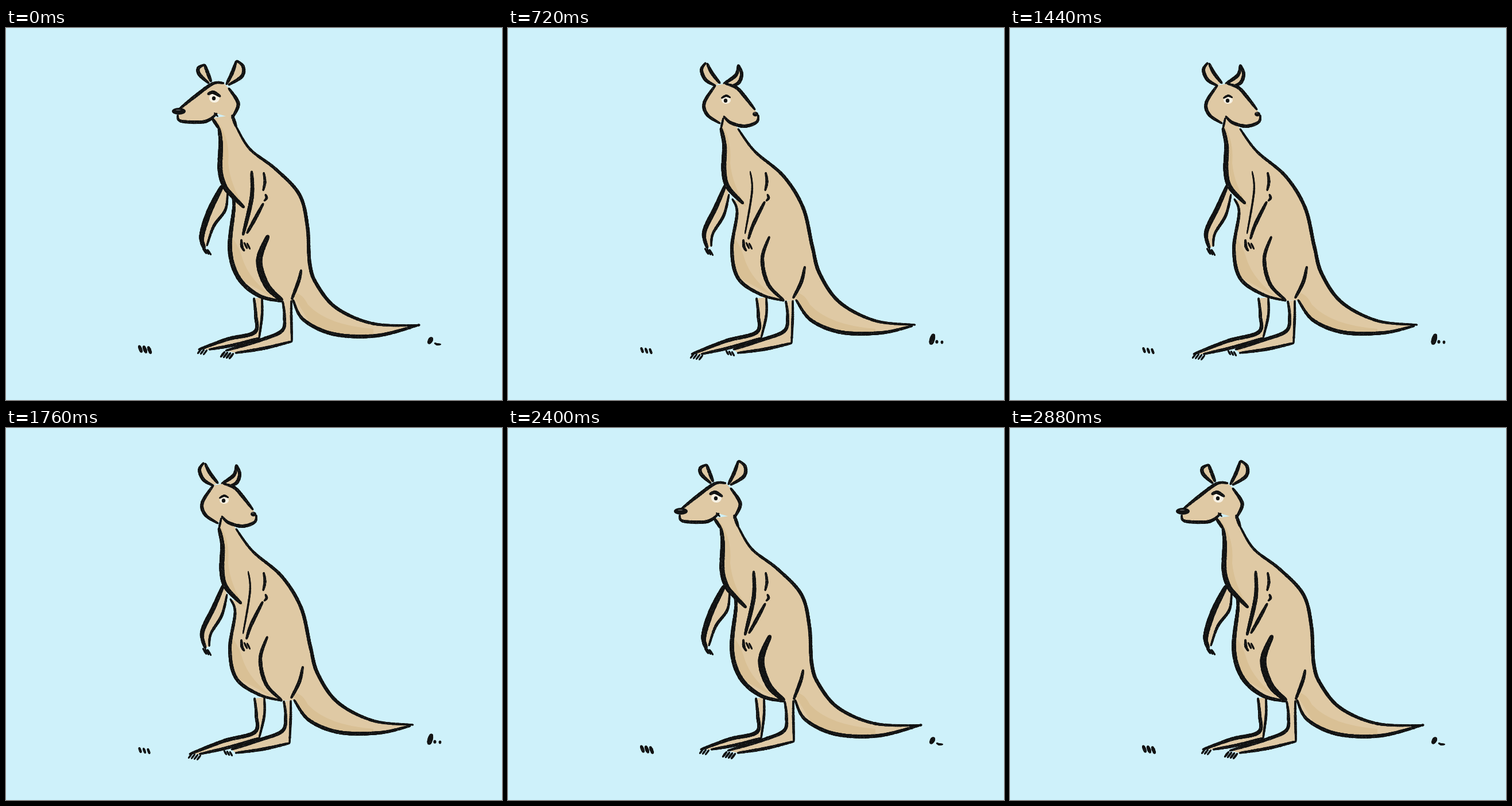
These frames come from a looping animation (864x648 px, 2960 ms). An HTML page with a canvas:

```html
<!DOCTYPE html>
<html lang="en">
<head>
<meta charset="utf-8">
<title>Kangaroo</title>
<style>
html, body { margin: 0; width: 100%; height: 100%; overflow: hidden; background: #cef1fa; }
canvas { display: block; }
</style>
</head>
<body>
<canvas id="stage" width="864" height="648"></canvas>
<script>
const SKY = '#cef1fa', TAN = '#dfc9a4', SHADE = '#d9c095', INK = '#131414';
const TAU = Math.PI * 2;
let g, seed;
const random = () => (seed = seed * 16807 % 2147483647) / 2147483647;

// Catmull-Rom samples through "x y x y ..." points, about one per pixel.
function sample(text) {
  const n = text.split(' ').map(Number), pts = [], out = [];
  while (n.length) pts.push(n.splice(0, 2));
  for (let i = 0; i < pts.length - 1; i++) {
    const b = pts[i], c = pts[i + 1], a = pts[i - 1] || b, d = pts[i + 2] || c;
    const steps = Math.ceil(Math.hypot(c[0] - b[0], c[1] - b[1]));
    for (let k = 0; k <= steps; k++) {
      const t = k / steps;
      out.push(b.map((v, j) => v + t / 2 * (c[j] - a[j] +
        t * (2 * a[j] - 5 * v + 4 * c[j] - d[j] + t * (3 * (v - c[j]) + d[j] - a[j])))));
    }
  }
  return out;
}

function oval(x, y, rx, ry, color) {
  g.fillStyle = color;
  g.beginPath();
  g.ellipse(x, y, rx, ry, 0, 0, TAU);
  g.fill();
}

// Tapered brush line with a chalky grain.
function ink(w, text) {
  const pts = sample(text), last = pts.length - 1;
  const width = i => w * (0.45 + 0.55 * Math.sqrt(Math.max(0, Math.sin(Math.PI * i / last))));
  pts.forEach(([x, y], i) => {
    const r = width(i) / 2 * (0.92 + random() * 0.16);
    oval(x, y, r, r, INK);
  });
  g.fillStyle = 'rgba(125,130,128,.45)';
  pts.forEach(([x, y], i) => {
    const v = width(i);
    if (v > 4 && random() < 0.35) g.fillRect(x + (random() - .5) * v, y + (random() - .5) * v, 1, 1);
  });
}

function fill(forward, backward) {
  const path = new Path2D();
  const pts = forward.flatMap(sample).concat(backward.flatMap(s => sample(s).reverse()));
  for (const [x, y] of pts) path.lineTo(x, y);
  g.fillStyle = TAN;
  g.fill(path);
  return path;
}

function ticks(x, y, gap, lean, len, count = 3, w = 3.5) {
  for (let i = 0; i < count; i++) {
    const tx = x + i * gap, ty = y + i;
    ink(w, `${tx} ${ty} ${tx + lean} ${ty + len}`);
  }
}

// Hip, leg width, ankle, instep, toe, heel and end of the sole.
function leg(w, x, y, wide, ax, ay, mx, my, tx, ty, hx, hy, sx, sy) {
  const knee = (y + ay) / 2;
  const front = `${x} ${y} ${x + 3} ${knee} ${ax} ${ay} ${mx} ${my} ${tx} ${ty}`;
  const back = `${x + wide} ${y - 2} ${x + wide} ${knee} ${hx} ${hy}`;
  const sole = `${hx} ${hy} ${(hx + sx) / 2} ${(hy + sy) / 2 + 2} ${sx} ${sy}`;
  fill([front], [sole, back]);
  ink(w, front);
  ink(4.5, back);
  ink(5.5, sole);
}

const upright = {
  chest: '371 175 374 200 373 248 381 276 393 291 414 312',
  belly: '394 292 397 312 390 385 405 435 440 466 480 476',
  back: '401 172 425 211 470 246 511 290 525 345 529 410 541 446 576 488 640 515 720 518',
  tail: '500 474 518 508 570 533 645 536 720 517',
  arm: '376 276 354 320 341 362 345 383', armW: 10,
  inner: '386 288 382 317 362 345 350 379',
  sleeve: '428 250 428 295 413 360', sleeveW: 7,
  elbow: '448 306 434 332 420 357',
  thigh: '456 363 441 405 454 448 480 474', thighW: 11,
  haunch: '514 422 510 440 498 472'
};
const leaning = {
  chest: '371 175 377 205 376 248 383 277 409 305',
  belly: '391 298 399 322 390 385 401 436 440 464 480 475',
  back: '401 176 430 215 480 258 514 313 530 380 543 428 578 478 640 510 709 517',
  tail: '502 474 528 509 580 530 650 531 704 519',
  arm: '379 273 362 312 342 355 347 383', armW: 8,
  inner: '385 290 376 326 357 358 354 380',
  sleeve: '422 250 425 285 413 358', sleeveW: 3.5,
  elbow: '447 303 427 343 419 367',
  thigh: '455 364 443 402 453 446 480 474', thighW: 6.5,
  haunch: '517 416 511 442 497 470'
};

// Heads: neck front and back, brow, mouth, skull, then ears as outer and inner edges.
const leftUpright = {
  neck: ['359 157 371 175', '394 152 401 172'],
  face: ['379 96 360 97 328 120 302 141', '299 152 304 162 338 164 354 160 367 149',
    '388 105 402 125 404 137 394 157'],
  ears: ['345 64 335 70 337 81 353 96', '346 64 357 93', '402 57 413 67 411 84 388 99', '401 58 394 78 384 98'],
  nose: [301, 145, 12, 6], eye: [363, 122, 9, 8], lid: '352 115 361 112 373 119', lidW: 6
};
const leftLeaning = {
  neck: ['361 159 371 175', '395 156 401 176'],
  face: ['378 96 362 98 335 118 303 142', '301 151 299 159 306 164 340 165 368 153',
    '388 107 405 131 405 142 396 157'],
  ears: ['345 63 335 71 339 84 351 95', '347 64 361 95', '400 57 413 68 410 83 388 100', '400 60 394 80 383 97'],
  nose: [300, 146, 10, 4.5], eye: [361, 122, 8, 7], lid: '351 115 360 113 371 118', lidW: 4
};
const rightUpright = {
  neck: ['375 157 371 175', '393 165 401 172'],
  face: ['376 97 398 102 413 118 431 145', '434 153 433 162 410 170 388 165 376 154',
    '360 103 342 131 348 152 371 166'],
  ears: ['344 62 335 74 342 91 360 102', '346 62 354 77 369 97', '397 64 407 80 403 95 385 99', '394 65 389 81 375 96'],
  nose: [429, 150, 6, 5], eye: [380, 127, 7, 9], lid: '372 121 378 118 386 121', lidW: 6
};
const rightLeaning = {
  neck: ['375 157 371 175', '393 165 401 176'],
  face: ['379 97 398 104 412 119 430 142', '436 152 433 164 412 171 388 165 376 154',
    '361 100 342 130 347 151 369 166'],
  ears: ['344 61 337 73 344 90 360 100', '347 62 355 78 369 96', '402 65 407 80 402 95 388 102', '401 65 397 82 376 97'],
  nose: [431, 150, 5, 4], eye: [380, 126, 8, 6], lid: '372 122 380 118 387 121', lidW: 4
};

const shading = new Path2D('M366 160 Q391 190 387 235 Q391 275 416 312 L360 280Z' +
  'M380 350 Q404 372 412 402 Q424 440 470 472 L375 420Z' +
  'M498 462 Q514 458 526 482 Q560 518 640 524 L640 545 L540 532Z');

function drawLegs(right, lean) {
  // far leg first
  const reach = right ? [320, 568, 337, 568] : [336, 560, 354, 560];
  const [tx, ty, sx, sy] = reach;
  const mid = right ? 380 : 386;
  leg(lean && !right ? 5 : 6.5, 432 + lean, 471, 14 + 3 * lean * right, 433, 530, mid, right ? 545 : 542, tx, ty, 441, 540, sx, sy);
  ticks(tx + 4, ty - 1, 5, -6, 8, right ? 4 : 3);

  if (!lean) {
    leg(6, 482, 476, 15, 481, 527, 445, 543, 383, 562, 498, 546, 400, 566);
    ticks(381, 564, 5, -7, 9, 4, 4);
  } else if (right) {
    leg(6, 484, 476, 12, 481, 528, 440, 544, 393, 560, 494, 549, 400, 566);
    ticks(380, 562, 5, 4, 7);
  } else {
    leg(9, 481, 478, 17, 476, 528, 432, 546, 390, 559, 497, 547, 408, 563);
    ticks(389, 560, 5, -2, 8, 4);
  }
}

function drawPose(right, lean) {
  const canvas = document.createElement('canvas');
  canvas.width = 864;
  canvas.height = 648;
  g = canvas.getContext('2d');
  seed = 7;
  g.fillStyle = SKY;
  g.fillRect(0, 0, 864, 648);

  const body = lean ? leaning : upright;
  const head = right ? (lean ? rightLeaning : rightUpright) : (lean ? leftLeaning : leftUpright);

  fill([body.arm], [body.inner]);
  ink(body.armW, body.arm);
  ink(5, body.inner);
  ticks(343, 384, 4, 6, 9 + lean);
  drawLegs(right, lean);

  const torso = fill([head.neck[0], body.chest, body.belly, body.tail], [body.back, head.neck[1]]);
  g.save();
  g.clip(torso);
  g.fillStyle = SHADE;
  g.fill(shading);
  g.restore();
  ink(8.5, body.chest);
  ink(lean ? 6 : 7.5, body.belly);
  ink(6, body.back);
  ink(6.5, body.tail);
  ink(body.sleeveW, body.sleeve);
  ink(6, body.elbow);
  ink(body.thighW, body.thigh);
  ink(6, body.haunch);
  ink(5, '449 252 451 268 448 283');
  ink(4.5, '452 290 454 296 450 301');
  ink(5, '410 369 411 381 415 388');
  ticks(415, 374, 5, 5, 10, 2);

  const [outerL, innerL, outerR, innerR] = head.ears;
  fill([outerL], [innerL]);
  fill([outerR], [innerR]);
  head.ears.forEach(s => ink(6, s));
  fill(head.face.slice(0, 2), [head.face[2]]);
  head.face.forEach(s => ink(5.8, s));
  head.neck.forEach((s, i) => right && i ? 0 : ink(right ? 4 : 5.5, s));

  const [nx, ny, nw] = head.nose, [ex, ey, ew, eh] = head.eye;
  oval(...head.nose, INK);
  oval(nx - 1, ny - 2, nw * .35, 1, '#555');
  oval(ex, ey, ew, eh, '#f8f2e4');
  oval(ex - 1, ey + .5, 3.2, 3.6, INK);
  ink(head.lidW, head.lid);
  if (!right) ink(3, '363 148 369 154');

  // grass
  if (lean) {
    ticks(232, 557, 7.5, 3, 8, 3, 4.5);
    ink(9, '741 535 737 549');
    ticks(747, 545, 9, 0, 3, 2, 5);
  } else {
    ticks(232, 554, 8, 4, 10, 3, 6);
    ink(8, '741 541 737 548');
    ink(4, '747 549 751 551 757 551');
  }
  return canvas;
}

const poses = [0, 1].map(right => [0, 1].map(lean => drawPose(right, lean)));
const STEP = 80, LOOP = 2960;
const screen = document.getElementById('stage').getContext('2d');
const start = performance.now();

function frame(now) {
  const step = Math.floor(Math.max(0, now - start) % LOOP / STEP);
  const right = step >= 8 && step < 28 ? 1 : 0;
  // the line boil restarts at steps 13 and 28
  const lean = (step >= 13 && step < 28 ? step + 1 : step) % 2;
  screen.drawImage(poses[right][lean], 0, 0);
  requestAnimationFrame(frame);
}
frame(start);
</script>
</body>
</html>
```
